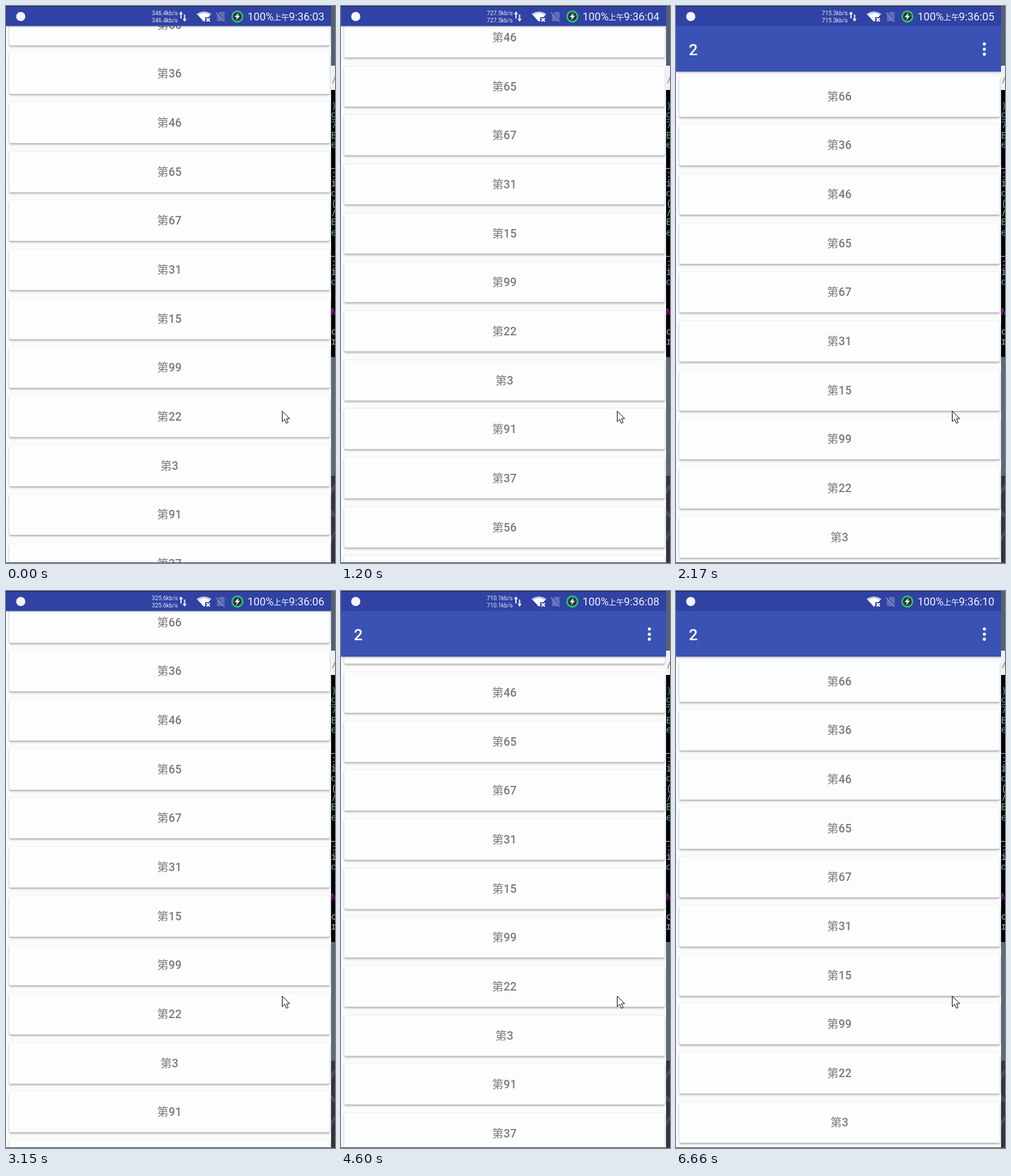
Animation of 502x849 px, one loop 6.9 s. Source, as an HTML page:

```html
<!DOCTYPE html>
<html lang="zh">
<head>
<meta charset="utf-8">
<title>Scrolling list</title>
<style>
html, body { margin: 0; width: 100%; height: 100%; overflow: hidden; background: #000; }
body { font-family: Roboto, "Noto Sans CJK SC", "Noto Sans CJK", sans-serif; }
#stage { position: relative; width: 502px; height: 849px; overflow: hidden; background: #5d6674; }
#phone { position: absolute; left: 0; top: 0; width: 496px; height: 848px; overflow: hidden; background: #fafafb; }
#list, #bar { position: absolute; left: 0; top: 0; width: 496px; }
.card {
  position: absolute; left: 4.5px; width: 489.5px; height: 62px; border-radius: 2px;
  background: #fcfdfe; box-shadow: 0 2px 3px rgba(0, 0, 0, .3), 0 0 1px rgba(0, 0, 0, .15);
  color: #7b7b7b; font-size: 17.5px; font-weight: 500; line-height: 63px; text-align: center;
}
#bar { top: 30px; height: 70px; background: #3a52b4; box-shadow: 0 1px 3px rgba(0, 0, 0, .35); }
#over, #side { position: absolute; left: 0; top: 0; }
</style>
</head>
<body>
<div id="stage">
  <svg id="side" width="502" height="849">
    <rect x="496" y="0" width="6" height="91" fill="#566073"/>
    <rect x="496" y="91" width="6" height="37" fill="#f1f1f1"/>
    <rect x="496" y="128" width="6" height="407" fill="#000"/>
    <rect x="496" y="535" width="6" height="181" fill="#5f6876"/>
    <rect x="496" y="716" width="6" height="133" fill="#34353c"/>
    <path d="M496 735l6-7v8l-6 9zM496 768l6 5v7l-6-4zM496 808l6-9v6l-6 12z" fill="#4b4c54"/>
    <g id="term" font-family="Noto Sans Mono, monospace" font-size="14"></g>
  </svg>
  <div id="phone">
    <div id="list"></div>
    <div id="bar">
      <svg width="496" height="70" fill="#fff">
        <text x="19.5" y="45" font-size="24" font-weight="500">2</text>
        <circle cx="470.5" cy="28" r="2.4"/>
        <circle cx="470.5" cy="36" r="2.4"/>
        <circle cx="470.5" cy="43.5" r="2.4"/>
      </svg>
    </div>
  </div>
  <svg id="over" width="502" height="849">
    <rect width="496" height="30.5" fill="#3042a3"/>
    <rect width="496" height="1" fill="#1c2349"/>
    <rect y="848" width="502" height="1" fill="#4a4d52"/>
    <circle cx="22.5" cy="16" r="7" fill="#f4f5fb"/>
    <g id="net" fill="#e6e8f5">
      <g font-size="8.8"><text id="up" x="222.5" y="14"></text><text id="down" x="222.5" y="25"></text></g>
      <path d="M267 8l3.2 4.5h-2.2v6.5h-2v-6.5h-2.2zM272.500 24l-3.200-4.500h2.200v-6.500h2v6.500h2.200z"/>
    </g>
    <path d="M291 12Q302 5 313 12L309 17H304V22L302 24Z" fill="#fff"/>
    <path d="M291 12Q302 5 313 12L311 14Q302 8 293 14Z" fill="#c3c9e8"/>
    <path d="M306 18.500l5 5m0-5l-5 5" stroke="#fff" stroke-width="1.800"/>
    <path d="M322 13l4-4h7.500v14H322z" fill="#6370b6"/>
    <path d="M321 9l13 15" stroke="#3042a3" stroke-width="2.600"/>
    <path d="M320.500 10l13 14" stroke="#8d97cd" stroke-width="1.300"/>
    <circle cx="353" cy="16" r="8" fill="#26364e" stroke="#2fc765" stroke-width="2.400"/>
    <path d="M355 10l-6 7h3.500l-1.500 5 6-7.200h-3.500z" fill="#fff"/>
    <g fill="#f3f4fb" font-size="16.500">
      <text x="368.500" y="22">100%</text>
      <text x="408" y="21.500" font-size="12">上午</text>
      <text id="clock" x="431.500" y="22"></text>
    </g>
    <path d="M421.500 617.500v16l3.700-3.500 2.600 6 2.700-1.200-2.600-5.800h5z" fill="#fff" stroke="#111"/>
  </svg>
</div>
<script>
const $ = id => document.getElementById(id);
const LOOP = 6900, STEPS = 57, PITCH = 74.65, BAR = 70;

// step, scroll offset, slope per step
const KEYS = [
  [0, 109, 21], [6, 212, 11], [10, 239.5, 2], [11, 241, 0], [18, 0, 0],
  [21, 0, 0], [26, 90, 20], [33, 224.5, 4], [34, 227, 0], [43, 0, 0], [57, 0, 0]
];
// step, seconds, network rate
const TICKS = [
  [0, "03", "346.4"], [7, "04", "727.5"], [14, "05", "715.3"], [22, "06", "325.6"],
  [30, "07", "685.4"], [38, "08", "710.1"], [47, "09", "710.1"], [55, "10", ""]
];

[66, 36, 46, 65, 67, 31, 15, 99, 22, 3, 91, 37, 56, 42].forEach((n, i) => {
  const card = document.createElement("div");
  card.className = "card";
  card.style.top = 106.8 + i * PITCH + "px";
  card.textContent = "第" + n;
  $("list").append(card);
});

// Sliver of the terminal behind the phone: y, glyph, colour
const TEAL = "#5fa39a", GREY = "#a9b0b4";
[[118, "/", "#777"], [156, ")", TEAL], [170, "g", TEAL], [186, "7", TEAL], [202, "E", "#6bb58c"],
 [216, "e", TEAL], [246, "_", GREY], [261, ":", GREY], [275, "i", GREY], [290, "d", TEAL],
 [305, "(", GREY], [320, "/", GREY], [334, "E", "#6bb58c"], [350, "e", TEAL], [380, "_", GREY],
 [396, ":", GREY], [410, "i", GREY], [425, "d", TEAL], [471, "N", "#b52bb5"],
 [501, "c", GREY], [516, "r", GREY]].forEach(([y, glyph, fill]) => {
  const t = document.createElementNS("http://www.w3.org/2000/svg", "text");
  t.setAttribute("x", 496);
  t.setAttribute("y", y);
  t.setAttribute("fill", fill);
  t.textContent = glyph;
  $("term").append(t);
});

function scrollAt(k) {
  const i = Math.max(1, KEYS.findIndex(key => key[0] >= k));
  const [k0, a, m0] = KEYS[i - 1], [k1, b, m1] = KEYS[i];
  const h = k1 - k0, u = (k - k0) / h, v = 1 - u;
  return v * v * ((1 + 2 * u) * a + u * h * m0) + u * u * ((3 - 2 * u) * b - v * h * m1);
}

// The bar leaves with the list and returns at the first downward drag.
function barOffset(k, s) {
  const falling = k > 34 || (k > 11 && k <= 18);
  const peak = k > 18 ? 227 : 241;
  return falling ? Math.max(0, BAR - (peak - s)) : Math.min(BAR, s);
}

function draw(now) {
  const k = Math.min(STEPS - 1, Math.floor((now % LOOP + 11) * STEPS / LOOP));
  const s = scrollAt(k);
  $("list").style.transform = `translateY(${-s}px)`;
  $("bar").style.transform = `translateY(${-barOffset(k, s)}px)`;
  const [, sec, rate] = TICKS.filter(tick => tick[0] <= k).pop();
  $("clock").textContent = "9:36:" + sec;
  $("up").textContent = $("down").textContent = rate + "kb/s";
  $("net").style.display = rate ? "" : "none";
}

const start = performance.now();
(function frame() {
  draw(performance.now() - start);
  requestAnimationFrame(frame);
})();
</script>
</body>
</html>
```
